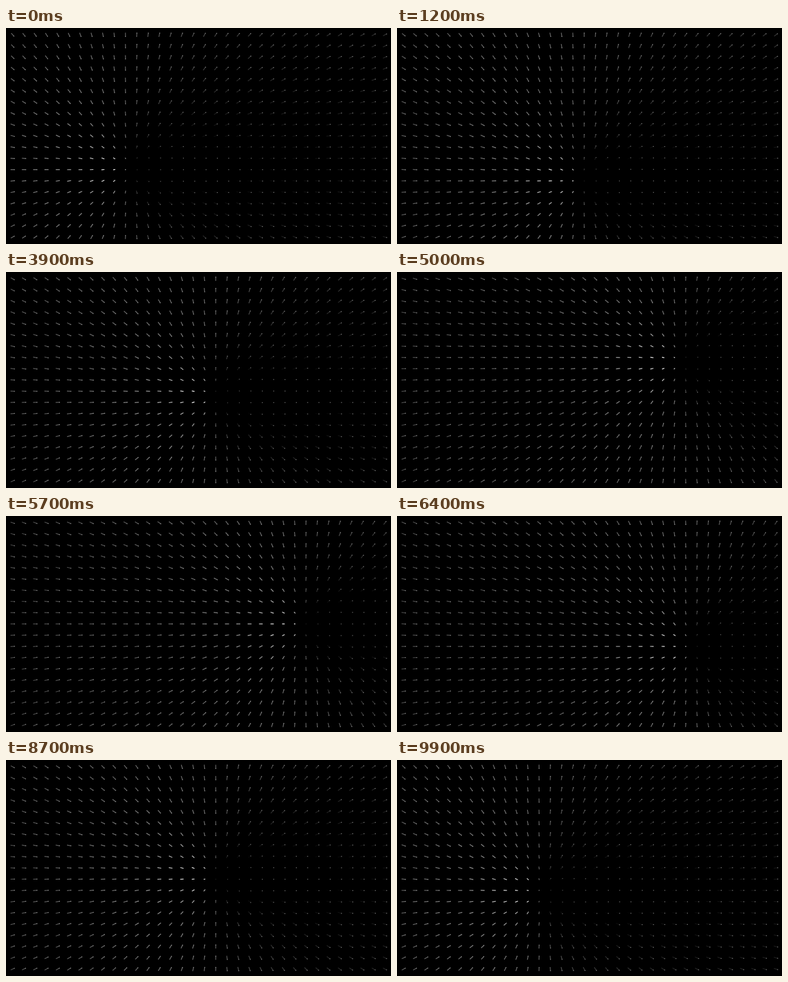
Animation, 600 px wide and 338 px high, one loop 10 s. Source, as an HTML page with a canvas:

```html
<!DOCTYPE html>
<html lang="en">
<head>
<meta charset="utf-8">
<title>Pin field</title>
<style>
  html, body { margin: 0; width: 100%; height: 100%; overflow: hidden; background: #000; }
  canvas { display: block; width: 100vw; height: 100vh; }
</style>
</head>
<body>
<canvas id="stage" width="600" height="338"></canvas>
<script>
const ctx = document.getElementById('stage').getContext('2d');
const LOOP = 10000, STEP = 100;
const COLS = 34, ROWS = 19, GAP = 17.58;
const HALF = 3.4, DEPTH = 45, WIDTH = 1.2;
const LIGHT_X = -0.96, LIGHT_Z = 0.26, GAIN = 1.5, CONTRAST = 1.3;

// time in seconds, x, y of the point every pin faces
const path = [
  [0, 193, 219], [1.2, 289, 236], [2.8, 223, 253], [5, 444, 140],
  [6.4, 460, 205], [7.5, 420, 168], [9.9, 226, 207]
];

function slope(i, k) {
  const a = path[Math.max(0, i - 1)], b = path[Math.min(path.length - 1, i + 1)];
  return (b[k] - a[k]) / (b[0] - a[0]);
}

function along(t, k) {
  let i = 0;
  while (i < path.length - 2 && t >= path[i + 1][0]) i++;
  const a = path[i], b = path[i + 1], d = b[0] - a[0];
  const u = (t - a[0]) / d, v = 1 - u;
  return a[k] * (1 + 2 * u) * v * v + b[k] * u * u * (3 - 2 * u)
    + d * u * v * (v * slope(i, k) - u * slope(i + 1, k));
}

const grey = v => {
  const c = Math.round(255 * Math.min(0.95, Math.max(0, v)));
  return `rgb(${c},${c},${c})`;
};

// mean light over the visible half of a thin cylinder
function shade(front, side) {
  let sum = 0;
  for (let u = -0.8; u < 0.9; u += 0.4) {
    sum += Math.max(0, front * Math.sqrt(1 - u * u) + side * u);
  }
  return GAIN * Math.pow(sum / 5, CONTRAST);
}

function drawPin(x, y, tx, ty) {
  const vx = tx - x, vy = ty - y, len = Math.hypot(vx, vy, DEPTH);
  const dx = vx / len, dy = vy / len, dz = DEPTH / len;
  const flat = Math.hypot(dx, dy) || 1e-6;
  const front = -dx * dz / flat * LIGHT_X + flat * LIGHT_Z;
  const body = shade(front, -dy / flat * LIGHT_X);
  // (ex, ey) leads to the right-hand end
  const half = dx < 0 ? -HALF : HALF;
  const ex = dx * half, ey = dy * half;

  ctx.strokeStyle = grey(body);
  ctx.beginPath();
  ctx.moveTo(x - ex, y - ey);
  ctx.lineTo(x + ex, y + ey);
  ctx.stroke();

  const cap = 0.1 + 0.45 * flat;
  if (cap > body) {
    ctx.fillStyle = grey(cap);
    ctx.fillRect(x + ex * 0.8 - WIDTH / 2, y + ey * 0.8 - WIDTH / 2, WIDTH, WIDTH);
  }
}

function draw(ms) {
  const t = Math.floor(ms % LOOP / STEP) * STEP / 1000;
  const tx = along(t, 1), ty = along(t, 2);
  ctx.fillStyle = '#000';
  ctx.fillRect(0, 0, 600, 338);
  ctx.lineWidth = WIDTH;
  for (let r = 0; r < ROWS; r++) {
    for (let c = 0; c < COLS; c++) {
      drawPin(300.5 + (c - (COLS - 1) / 2) * GAP, 168.9 + (r - (ROWS - 1) / 2) * GAP, tx, ty);
    }
  }
}

const start = performance.now();
function tick(now) {
  draw(Math.max(0, now - start));
  requestAnimationFrame(tick);
}
draw(0);
requestAnimationFrame(tick);
</script>
</body>
</html>
```
